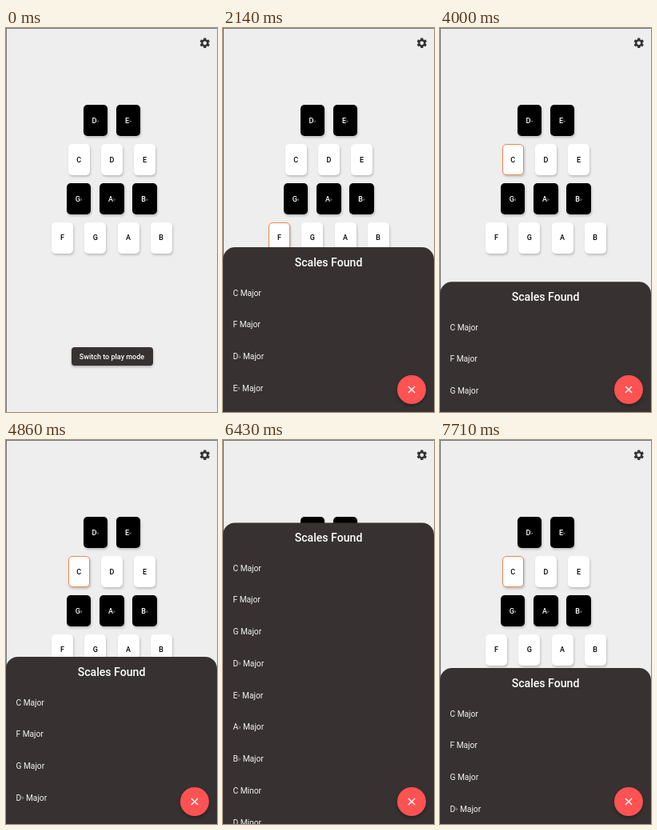
Write an HTML page that moves like this. It is 264x480 px and loops after 8000 ms.

```html
<!DOCTYPE html>
<html lang="en">
<head>
<meta charset="utf-8">
<title>Scale finder</title>
<style>
  html, body { margin: 0; width: 100%; height: 100%; overflow: hidden; }
  body { background: #eee; font-family: Roboto, sans-serif; }
  #stage { position: relative; width: 264px; height: 480px; overflow: hidden; background: #eee; }
  #stage > * { position: absolute; box-sizing: border-box; }
  .frame { inset: 0; border: solid #777; border-width: 1px 0 0 1px; }
  .gear { left: 241.2px; top: 10.8px; width: 15.6px; height: 15.6px; fill: #333; }
  .key, .mode, .title, .item { display: flex; align-items: center; white-space: pre; }
  .key, .mode, .title { justify-content: center; }
  .key { height: 39px; border-radius: 5px; font-size: 9px; font-weight: 500;
         box-shadow: 1px 2px 3px rgba(0, 0, 0, .2); }
  .white { width: 27px; background: #fff; color: #000; }
  .black { width: 30.5px; background: #000; color: #fff; }
  .key.on { border: 1px solid #e98a4e; }
  .flat { font: .68em/0 "DejaVu Sans", sans-serif; }
  .mode { left: 81.5px; top: 399px; width: 102px; height: 23px; border-radius: 4px;
          background: #373132; color: #fff; font-size: 9px; font-weight: 500;
          box-shadow: 0 1.5px 3px rgba(0, 0, 0, .3); }
  .sheet { left: 0; top: 0; width: 264px; height: 480px; border-radius: 15px 15px 0 0;
           background: #373231; color: #fff; }
  .title { height: 37px; font-size: 14.1px; font-weight: 500; }
  .item { position: absolute; left: 12.5px; height: 20px; font-size: 10.2px; color: #f4f4f4; }
  .fab { left: 218px; top: 434px; width: 36px; height: 36px; border-radius: 50%;
         background: #ff5252; box-shadow: 0 2px 4px rgba(0, 0, 0, .35); }
  .fab svg { display: block; width: 36px; height: 36px; stroke: #fff; stroke-width: 1.4; }
</style>
</head>
<body>
<div id="stage">
  <div class="frame"></div>
  <svg class="gear" viewBox="0 0 24 24"><path d="M19.14 12.94c.04-.3.06-.61.06-.94 0-.32-.02-.64-.07-.94l2.03-1.58a.49.49 0 0 0 .12-.61l-1.92-3.32a.49.49 0 0 0-.59-.22l-2.39.96c-.5-.38-1.03-.7-1.62-.94l-.36-2.54a.48.48 0 0 0-.48-.41h-3.84a.48.48 0 0 0-.47.41l-.36 2.54c-.59.24-1.13.57-1.62.94l-2.39-.96a.48.48 0 0 0-.59.22L2.74 8.87a.48.48 0 0 0 .12.61l2.03 1.58c-.05.3-.09.63-.09.94s.02.64.07.94l-2.03 1.58a.49.49 0 0 0-.12.61l1.92 3.32c.12.22.37.29.59.22l2.39-.96c.5.38 1.03.7 1.62.94l.36 2.54c.05.24.24.41.48.41h3.84c.24 0 .44-.17.47-.41l.36-2.54c.59-.24 1.13-.56 1.62-.94l2.39.96c.22.08.47 0 .59-.22l1.92-3.32a.48.48 0 0 0-.12-.61zM12 15.6A3.6 3.6 0 1 1 12 8.4a3.6 3.6 0 0 1 0 7.2z"/></svg>
  <div class="mode">Switch to play mode</div>
</div>
<script>
const LOOP = 8000, TICK = 1000 / 7;
const stage = document.getElementById('stage');

function add(parent, cls, text = '') {
  const el = document.createElement('div');
  el.className = cls;
  el.innerHTML = text.replace('♭', '<span class="flat">♭</span>');
  parent.append(el);
  return el;
}

// Keyboard: four centred rows
const keys = {};
['D♭ E♭', 'C D E', 'G♭ A♭ B♭', 'F G A B'].forEach((row, r) => {
  const notes = row.split(' '), black = r % 2 === 0;
  notes.forEach((note, i) => {
    const key = add(stage, 'key ' + (black ? 'black' : 'white'), note);
    const x = 132.4 + (i - (notes.length - 1) / 2) * 41.2;
    key.style.left = x - (black ? 15.25 : 13.5) + 'px';
    key.style.top = 96.2 + r * 48.9 + 'px';
    keys[note] = key;
  });
});

// Bottom sheet with one list per pressed note
const sheet = add(stage, 'sheet');
add(sheet, 'title', 'Scales Found');
function addList(names) {
  const list = add(sheet, 'list');
  names.forEach((name, i) => {
    add(list, 'item', name).style.top = 47.2 + i * 39.75 + 'px';
  });
  return list;
}
const major = s => s.split(' ').map(n => n + ' Major');
const listF = addList(major('C F D♭ E♭ A♭ B♭'));
const listC = addList([...major('C F G D♭ E♭ A♭ B♭'), 'C Minor', 'D Minor', 'E Minor']);

const fab = add(stage, 'fab',
  '<svg viewBox="0 0 36 36"><path d="M13.9 13.9l8.2 8.2m0-8.2l-8.2 8.2"/></svg>');

const out = p => 1 - (1 - p) ** 2.2;
const smooth = p => p * p * (3 - 2 * p);
const inOut = p => p < .5 ? 4 * p ** 3 : 1 - 4 * (1 - p) ** 3;
const slowIn = p => p * p;

// [start, end, from, to, easing]
const sheetMoves = [
  [1710, 2200, 480, 272, out],
  [2900, 3185, 272, 480, smooth],
  [3755, 4245, 480, 272, out],
  [4740, 5790, 272, 100, inOut],
  [6000, 7140, 100, 124, slowIn],
  [7140, 7710, 124, 285, smooth]
];
const fabMoves = [
  [1750, 1950, 0, 1, out],
  [2900, 3100, 1, 0, smooth],
  [3755, 3955, 0, 1, out]
];

function valueAt(moves, t) {
  let v = moves[0][2];
  for (const [start, end, from, to, ease] of moves) {
    if (t < start) break;
    v = from + (to - from) * ease(Math.min(1, (t - start) / (end - start)));
  }
  return v;
}

function draw(now) {
  // The screen refreshes seven times a second
  const t = Math.round(Math.floor((now % LOOP) / TICK + .04) * TICK / 10) * 10;
  const second = t >= 3500;
  sheet.style.transform = `translateY(${valueAt(sheetMoves, t)}px)`;
  fab.style.transform = `scale(${valueAt(fabMoves, t)})`;
  keys.F.classList.toggle('on', t >= 1710 && t < 3000);
  keys.C.classList.toggle('on', t >= 3570);
  listF.hidden = second;
  listC.hidden = !second;
}

const origin = performance.now();
function loop() {
  draw(performance.now() - origin);
  requestAnimationFrame(loop);
}
loop();
</script>
</body>
</html>
```
